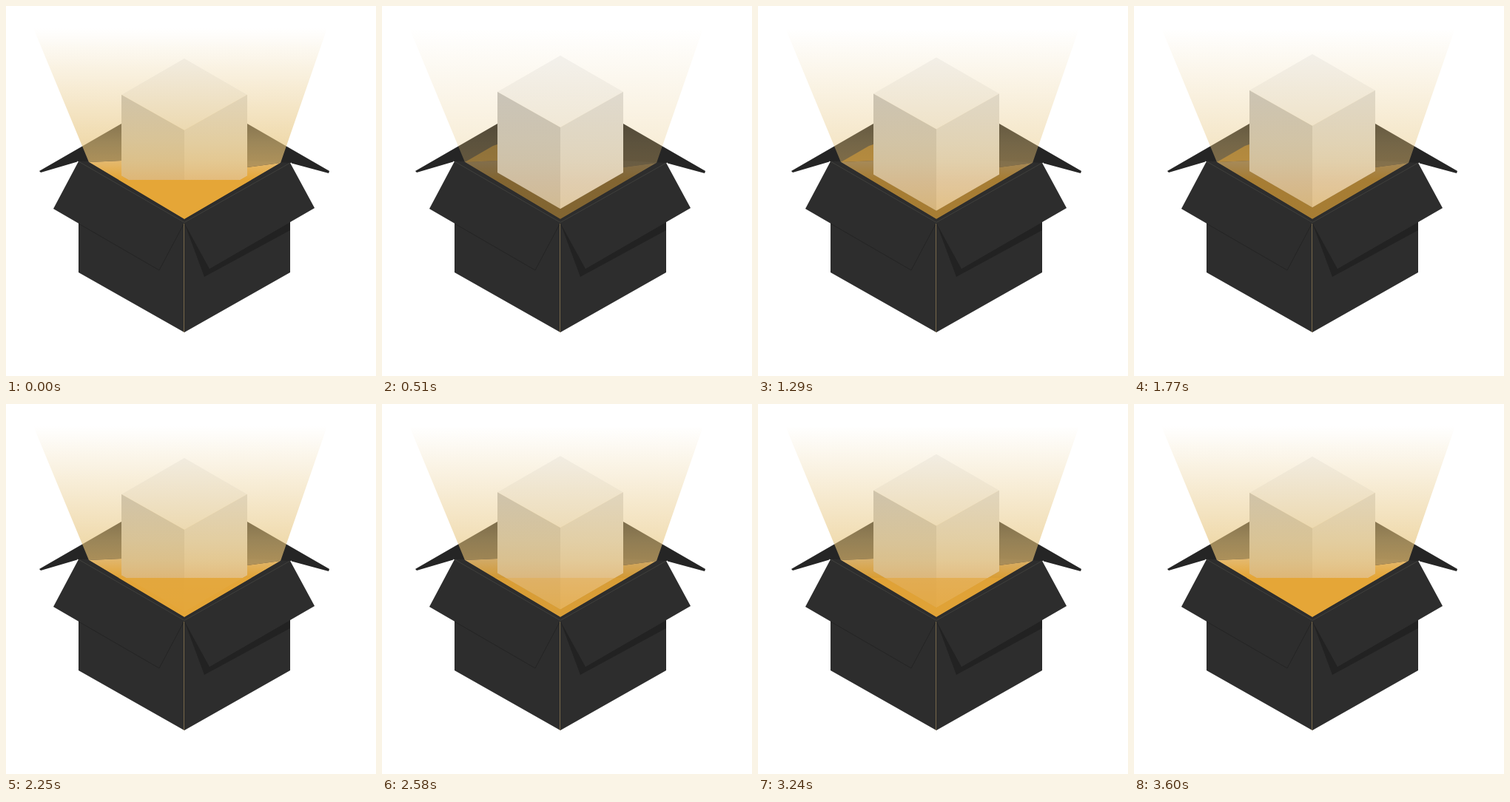
Recreate the animation shown at these times as an HTML page. Size 500x500 px, loop 3630 ms.

```html
<!DOCTYPE html>
<html lang="en">
<head>
<meta charset="utf-8">
<title>Glowing box</title>
<style>
  html, body { margin: 0; width: 100%; height: 100%; overflow: hidden; background: #fff; }
  svg { display: block; width: 100vw; height: 100vh; }
</style>
</head>
<body>
<svg viewBox="0 0 500 500">
  <defs>
    <linearGradient id="light" gradientUnits="userSpaceOnUse" x1="0" y1="30" x2="0" y2="288">
      <stop offset="0" stop-color="#e6c379" stop-opacity="0"/>
      <stop offset=".6" stop-color="#e6c379" stop-opacity=".62"/>
      <stop offset=".7" stop-color="#e6be70" stop-opacity=".7"/>
      <stop offset=".8" stop-color="#e5b262" stop-opacity=".8"/>
      <stop offset="1" stop-color="#e5a637" stop-opacity=".85"/>
    </linearGradient>
    <linearGradient id="glow" gradientUnits="userSpaceOnUse" x1="0" y1="205" x2="0" y2="234">
      <stop offset="0" stop-color="#e4bd7a"/>
      <stop offset="1" stop-color="#e5a637"/>
    </linearGradient>
  </defs>

  <!-- back flaps and inside -->
  <path fill="#252525" d="M45 223L156 159V230L112 212L98 210L47 225ZM326 159L437 223L436 226L384 212L371 212L326 230Z"/>
  <path fill="#2d2d2d" d="M98 210L156 209H326L384 212L241 293Z"/>
  <path class="lit" fill="url(#light)" d="M37 30H434L371 212L326 218L156 209L112 211Z"/>
  <path class="lit" fill="url(#glow)" d="M112 211L156 209L326 218L371 212L241 288Z"/>
  <path id="corner" fill="#e5a637" d="M112 211L150 189L156 187V209Z"/>

  <!-- floating cube, moved by its left corner -->
  <g id="cube">
    <path fill="#f4f4f4" d="M156 0L241 -49L326 0L241 48Z"/>
    <path fill="#c4c4c4" d="M156 0L241 48V158L156 109Z"/>
    <path fill="#dedede" d="M326 0L241 48V158L326 109Z"/>
  </g>
  <path id="tint" class="lit" fill="url(#light)"/>
  <path id="flood" fill="#e5a637" d="M151 235H332L241 288Z"/>

  <!-- box front -->
  <path fill="#2d2d2d" d="M98 210L112 211L241 288L371 212L384 212V360L241 441L98 360Z"/>
  <path fill="#fff" d="M97 209V294L64 274ZM385 211V293L417 273Z"/>
  <path fill="#222" d="M241 293L268 366L384 303V292L275 355Z"/>
  <path fill="#2d2d2d" d="M98 210L64 274L207 357L241 293ZM384 212L417 273L275 355L241 293Z"/>
  <path fill="none" stroke="#242424" d="M98 294L207 357L241 293"/>
  <path fill="none" stroke="#454541" stroke-width=".8" d="M98 210L241 292.500L384 212"/>
  <path stroke="#77684a" d="M240.500 294V441"/>
</svg>
<script>
  const LOOP = 3630, STEP = 30;
  // [time in ms, value]
  const height = [[0, 120], [540, 116], [1100, 120.500], [1650, 113.300], [2260, 122], [3010, 115], [3600, 120], [LOOP, 120]];
  const power = [[0, 1], [540, .46], [1290, .66], [1770, .66], [2300, .99], [2800, .83], [3570, 1], [LOOP, 1]];
  const $ = id => document.getElementById(id);
  const lit = document.querySelectorAll('.lit');

  function ease(keys, t) {
    const i = keys.findIndex(k => k[0] > t);
    const [t0, v0] = keys[i - 1], [t1, v1] = keys[i];
    return v0 + (v1 - v0) * (1 - Math.cos(Math.PI * (t - t0) / (t1 - t0))) / 2;
  }

  function draw() {
    const t = Math.floor(performance.now() % LOOP / STEP) * STEP;
    const y = ease(height, t), glow = ease(power, t);
    $('cube').setAttribute('transform', `translate(0 ${y})`);
    $('tint').setAttribute('d', `M156 ${y}L241 ${y - 49}L326 ${y}V${y + 109}L241 ${y + 158}L156 ${y + 109}Z`);
    lit.forEach(el => el.setAttribute('opacity', glow));
    $('corner').setAttribute('opacity', glow < .75 ? glow * .8 : 0);
    $('flood').setAttribute('opacity', Math.max(0, (glow - .84) / .16));
    requestAnimationFrame(draw);
  }
  draw();
</script>
</body>
</html>
```
